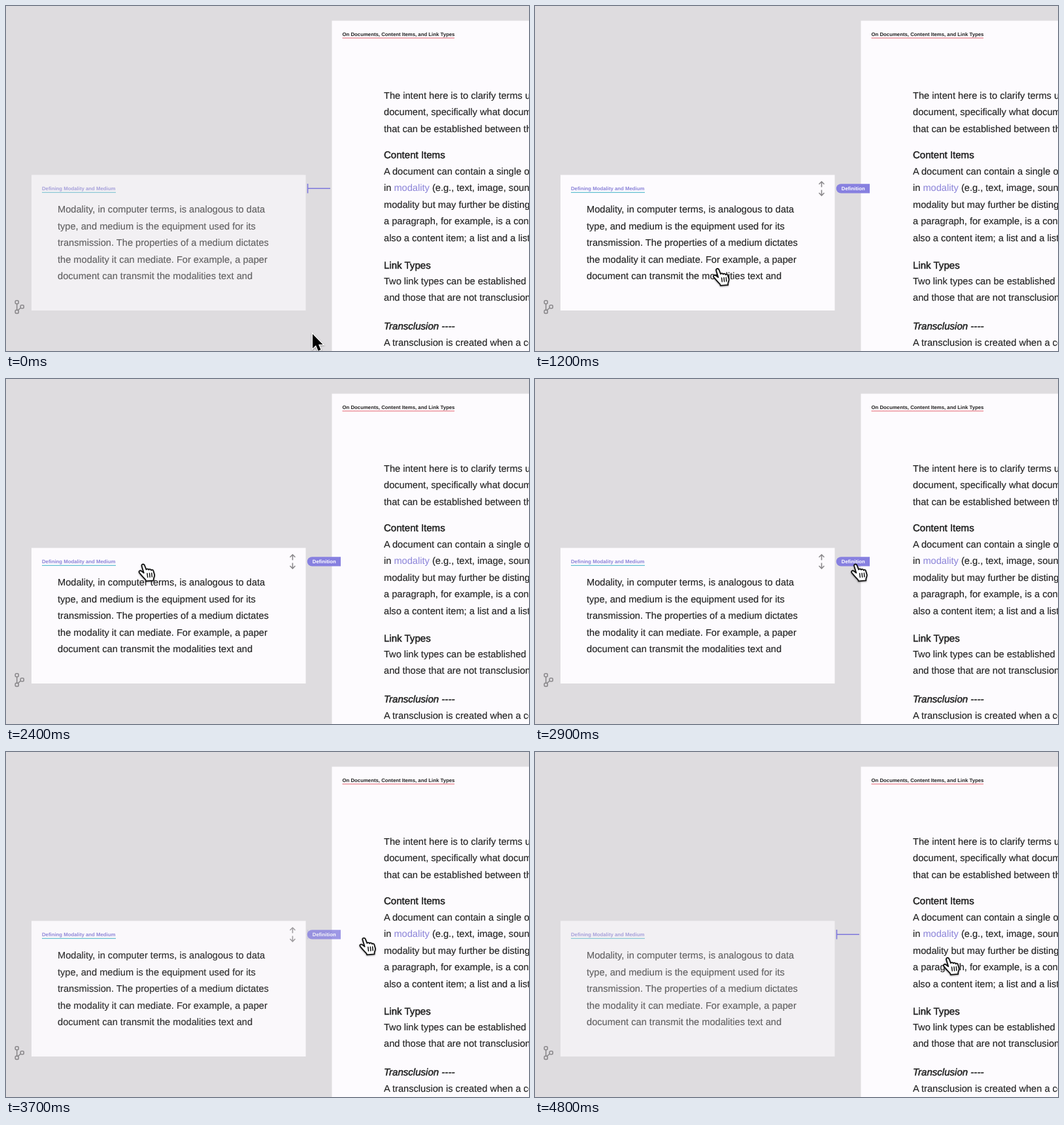
These frames come from a looping animation (800 px wide and 528 px high, 5 s). An HTML page:

```html
<!DOCTYPE html>
<html lang="en">
<head>
<meta charset="utf-8">
<title>Linked documents</title>
<style>
  html, body { margin: 0; width: 100%; height: 100%; overflow: hidden; background: #dedcdf; }
  svg { display: block; width: 800px; height: 528px; }
  text {
    font: 14.62px "Liberation Sans", Arial, sans-serif;
    fill: #222; stroke: #222; stroke-width: .15px;
    text-rendering: geometricPrecision;
  }
  .head { font-size: 15.05px; stroke-width: .5px; }
  .em { font-style: italic; }
  .title { font-size: 7.79px; font-weight: bold; stroke: none; }
  .link { fill: #8a82d8; stroke: none; }
  .icon { fill: none; stroke: #8b898c; stroke-width: 1.6px; }
  .cursor { filter: drop-shadow(0 1.5px 1.2px rgba(0, 0, 0, .4)); }
</style>
</head>
<body>
<svg viewBox="0 0 800 528">
  <rect width="800" height="528" fill="#dedcdf"/>

  <g class="icon">
    <rect x="14.2" y="450.8" width="5" height="5" rx="1.7"/>
    <rect x="14.2" y="465.4" width="5" height="5" rx="1.7"/>
    <rect x="22.2" y="457.8" width="5" height="5" rx="1.7"/>
    <path d="M16.7 455.8V465.4M18.3 465.6L22.4 462"/>
  </g>

  <g id="doc">
    <rect x="498.5" y="22.5" width="302" height="506" fill="#fdfbfe"/>
    <text class="title" x="514.5" y="45.8">On Documents, Content Items, and Link Types</text>
    <path d="M514.5 49H686" stroke="#e4616f" stroke-width="1.2"/>
  </g>

  <g id="card">
    <rect x="39" y="258.5" width="419.5" height="207.5" fill="#fdfbfe"/>
    <text class="title link" x="55" y="281.8">Defining Modality and Medium</text>
    <path d="M55 285.3H168" stroke="#62bfd0" stroke-width="1.2"/>
  </g>

  <path id="connector" d="M461.5 272V286.5M461.5 279.2H496" stroke="#7d77dc" stroke-width="1.6"/>
  <g id="active">
    <path class="icon" d="M438.4 277.3V269.2M434.4 272.8L438.4 268.8L442.4 272.8M438.4 281.5V289.6M434.4 286L438.4 290L442.4 286"/>
    <path d="M512 272.2H468a7.2 7.2 0 0 0 0 14.4H512Z" fill="#8780e0"/>
    <text class="title" x="468.8" y="282.4" style="fill:#fff">Definition</text>
  </g>

  <g id="cursor" class="cursor">
    <path id="arrow" d="M0 0V22L5 17.3L8.6 25.7L12.5 24L9 16H15.6Z" fill="#000" stroke="#fff" stroke-width="2.6" paint-order="stroke"/>
    <g id="hand" transform="translate(-8 -1.5)" stroke="#111" stroke-width="1.8" stroke-linejoin="round" stroke-linecap="round">
      <path fill="#fff" d="M5.2 4.5C4.2 1.6 8 .4 9.3 3L12 9.6C12.4 8.4 15 8 15.8 10C16.5 8.9 19 8.6 19.6 10.8C20.4 9.8 22.6 9.8 23 12L24.6 17.5C25 20 23.5 22 23.2 24V26.4L11.7 27.3L11.2 25.5C8 22 4 18 1.5 14.5C0 12 2.5 10.3 4.7 12L8.3 14.8Z"/>
      <path fill="none" stroke-width="1.5" d="M13.5 15.5L14.2 21.5M17 15.3L17.6 21.3M20.3 15L20.9 20.8"/>
    </g>
  </g>
</svg>
<script>
const LOOP = 5000, STEP = 100;
const $ = id => document.getElementById(id);

function addLines(parent, x, y, lines, cls = "") {
  lines.forEach((line, i) => {
    const text = document.createElementNS("http://www.w3.org/2000/svg", "text");
    text.setAttribute("x", x);
    text.setAttribute("y", y + i * 25.5);
    text.setAttribute("class", cls);
    text.innerHTML = line;
    parent.append(text);
  });
}

addLines($("card"), 79, 316.2, [
  "Modality, in computer terms, is analogous to data",
  "type, and medium is the equipment used for its",
  "transmission. The properties of a medium dictates",
  "the modality it can mediate. For example, a paper",
  "document can transmit the modalities text and"
]);
const doc = $("doc");
addLines(doc, 578, 141.7, [
  "The intent here is to clarify terms used",
  "document, specifically what document",
  "that can be established between them"
]);
addLines(doc, 578, 233, ["Content Items"], "head");
addLines(doc, 578, 257.9, [
  "A document can contain a single or",
  'in <tspan class="link">modality</tspan> (e.g., text, image, sound',
  "modality but may further be distinguished",
  "a paragraph, for example, is a content",
  "also a content item; a list and a list"
]);
addLines(doc, 578, 402.4, ["Link Types"], "head");
addLines(doc, 578, 425.7, [
  "Two link types can be established between",
  "and those that are not transclusions"
]);
addLines(doc, 578, 495.3, ["Transclusion ----"], "head em");
addLines(doc, 578, 520.2, ["A transclusion is created when a content"]);

// Pointer path: time, x, y
const path = [
  [0, 469, 502], [600, 280, 402], [1200, 280, 402], [1350, 318, 366],
  [1600, 182.5, 310.5], [1800, 102, 312], [2100, 146, 318], [2400, 210.5, 283.5],
  [3000, 507.5, 283.5], [3500, 507.5, 283.5], [4000, 623.5, 286.5],
  [4600, 623.5, 286.5], [4800, 632, 315], [5000, 632, 315]
];

// Speed at a key; zero at the ends and next to a rest
function slope(i, axis) {
  const [a, b, c] = [path[i - 1], path[i], path[i + 1]];
  if (!a || !c) return 0;
  const before = b[axis] - a[axis], after = c[axis] - b[axis];
  return before * after <= 0 ? 0 : (before + after) / (c[0] - a[0]);
}

function pointer(t, axis) {
  const i = path.findIndex((key, n) => n && t < key[0]) - 1;
  const a = path[i], b = path[i + 1], span = b[0] - a[0], u = (t - a[0]) / span;
  const ease = u * u * (3 - 2 * u);
  return a[axis] + (b[axis] - a[axis]) * ease
    + span * u * (1 - u) * ((1 - u) * slope(i, axis) - u * slope(i + 1, axis));
}

const ramp = (t, start, end) => Math.min(1, Math.max(0, (t - start) / (end - start)));

function draw(now) {
  const t = Math.floor(now % LOOP / STEP) * STEP;
  const hover = ramp(t, 250, 700) - ramp(t, 3600, 4100);
  const overLink = t >= 300;
  $("card").setAttribute("opacity", .66 + .34 * hover);
  $("active").setAttribute("opacity", hover);
  $("connector").setAttribute("opacity", 1 - hover);
  $("arrow").setAttribute("display", overLink ? "none" : "inline");
  $("hand").setAttribute("display", overLink ? "inline" : "none");
  $("cursor").setAttribute("transform", `translate(${pointer(t, 1)} ${pointer(t, 2)})`);
}

const start = performance.now();
function tick() {
  draw(performance.now() - start);
  requestAnimationFrame(tick);
}
tick();
</script>
</body>
</html>
```
